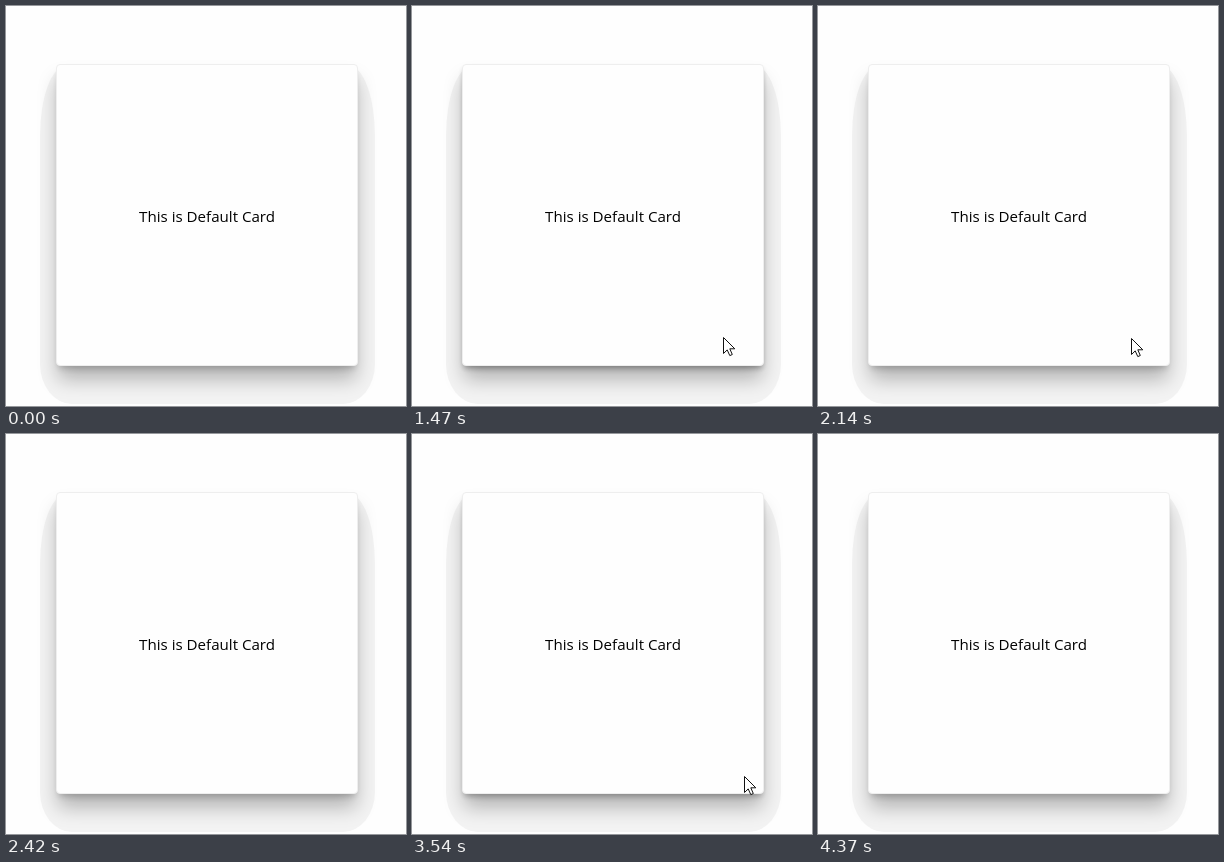
Animation of 400x400 px, one loop 5020 ms. Source, as an HTML page:

```html
<!DOCTYPE html>
<html lang="en">
<head>
<meta charset="utf-8">
<title>Default card</title>
<style>
  html, body { margin: 0; width: 100%; height: 100%; overflow: hidden; background: #fefefe; }
  #stage { position: absolute; left: 0; top: 0; width: 400px; height: 400px; overflow: hidden; }
  #stage > * { position: absolute; box-sizing: border-box; }
  #halo {
    left: 34px; top: 60px; width: 335px; height: 338px; background: #f3f3f3;
    border-radius: 26px 26px 32px 32px / 70px 70px 40px 40px;
  }
  #card, #lift { left: 50px; top: 58px; width: 302px; height: 302px; border-radius: 4px; }
  #card {
    background: #fefefe; border: 1px solid #eee;
    box-shadow: 0 5px 6px -3px rgba(0,0,0,.2), 0 15px 20px -2px rgba(0,0,0,.27);
  }
  #lift { box-shadow: 0 3px 5px -1px rgba(0,0,0,.42); }
  svg { left: 0; top: 0; }
  text { font: 15.1px "Open Sans", "Noto Sans", sans-serif; text-anchor: middle; }
</style>
</head>
<body>
<div id="stage">
  <div id="halo"></div>
  <div id="card"></div>
  <div id="lift"></div>
  <svg width="400" height="400">
    <text x="201" y="216">This is Default Card</text>
    <path id="cursor" d="M.5 .5V16.5L4.2 12.9 6.8 18.6 9.3 17.5 6.8 11.8H11.8Z" fill="#fff" stroke="#111"/>
  </svg>
</div>
<script>
const LOOP = 5020;
const ENTER = 520;
const lift = document.getElementById('lift');
const cursor = document.getElementById('cursor');

// The pointer glides in to a resting place, waits, and leaves the stage.
const visits = [
  { start: 1130, leave: 2090, end: 2420, from: [399, 352], rest: [307, 330], to: [401, 364] },
  { start: 3240, leave: 3760, end: 4370, from: [396, 372], rest: [327, 340], to: [349, 400] }
];

const ramp = (t, a, b) => Math.max(0, Math.min(1, (t - a) / (b - a)));
const easeOut = k => 1 - (1 - k) ** 3;
const smooth = k => k * k * (3 - 2 * k);
const between = (p, q, k) => p.map((v, i) => Math.round(v + (q[i] - v) * k));

function pointerAt(t, { start, leave, end, from, rest, to }) {
  return t < leave
    ? between(from, rest, easeOut(ramp(t, start, start + ENTER)))
    : between(rest, to, smooth(ramp(t, leave, end)));
}

// The shadow deepens while the pointer settles, then relaxes.
function liftAt(t, { start }) {
  const settled = start + ENTER;
  return smooth(ramp(t, start + 200, settled)) - smooth(ramp(t, settled + 60, settled + 220));
}

function draw() {
  const t = (performance.now() - origin) % LOOP;
  const visit = visits.find(v => t >= v.start && t < v.end);
  cursor.style.display = visit ? '' : 'none';
  lift.style.opacity = visit ? liftAt(t, visit) : 0;
  if (visit) cursor.setAttribute('transform', `translate(${pointerAt(t, visit)})`);
  requestAnimationFrame(draw);
}

const origin = performance.now();
draw();
</script>
</body>
</html>
```
